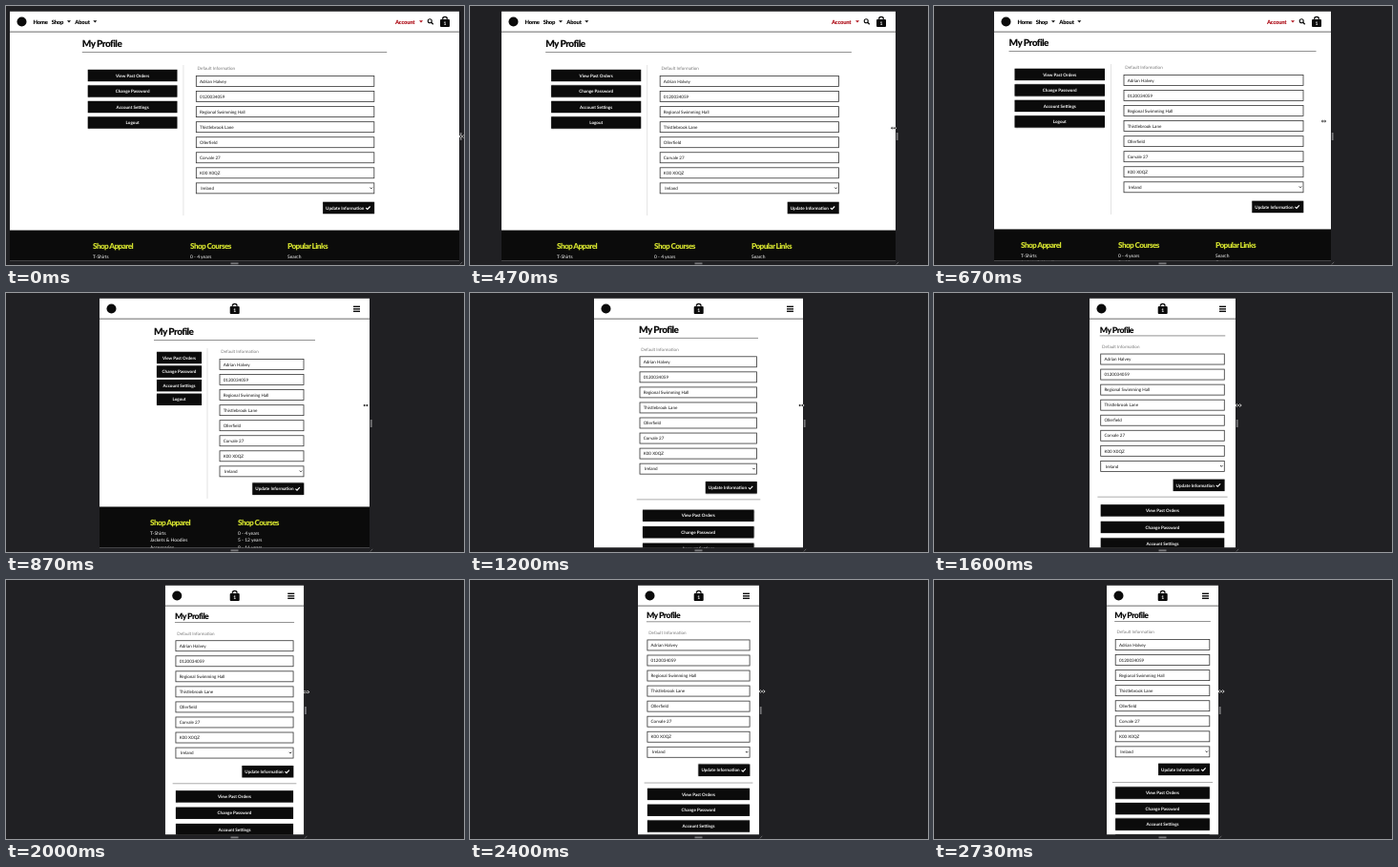
An HTML page with a canvas for the animation above (2.94 s loop, 480 by 272 pixels).

```html
<!DOCTYPE html>
<html lang="en">
<head>
<meta charset="utf-8">
<title>Responsive profile page</title>
<style>
  html, body { margin: 0; height: 100%; overflow: hidden; background: #202023; }
  canvas { display: block; width: 100vw; height: 100vh; }
</style>
</head>
<body>
<canvas id="stage" width="480" height="272"></canvas>
<script>
const ctx = document.getElementById('stage').getContext('2d');
const LOOP = 2940, FPS = 15, CENTER = 239.5, TOP = 5.5, BOTTOM = 267.5;
const INK = '#0b0b0b';

// [tick, left page edge, pointer x, pointer y]
const drag = [
  [3, 4, 478, 137], [5, 13, 467, 133], [10, 63, 408.5, 121], [11, 76, 398, 120],
  [13, 98, 377, 118], [15, 114, 362, 118], [18, 130, 347, 118], [19, 133, 344, 118],
  [22, 153, 328, 118], [24, 163, 319, 118], [27, 163, 319, 118], [35, 173, 307.5, 117],
  [36, 176, 306, 117], [41, 181, 301, 117]
];

// Breakpoints by page width. x is relative to the centre, y to the first field.
const layouts = [
  { min: 350, hr: 161, title: -35.8, rule: -30.5, form: [-40.5, 147.5], update: 133,
    menu: [-155, -60.5], menuY: -6, pitch: 16.5, divider: -54, footer: 156.5, columns: [-148.5, -46.5, 55.5] },
  { min: 292, hr: 134, title: -35.8, rule: -30.5, form: [-34, 123], update: 133,
    menu: [-129, -51], menuY: -6, pitch: 16.5, divider: -46, footer: 156, columns: [-125, -39, 47] },
  { min: 226, hr: 84.5, title: -30.5, rule: -25.5, form: [-15.5, 72.5], update: 130.7,
    menu: [-81.5, -34.5], menuY: -7, pitch: 14.6, divider: -28.5, footer: 149.5, columns: [-88.5, 3.5] },
  { min: 169, hr: 62.5, title: -30, rule: -25, form: [-61.5, 61], update: 132,
    menu: [-58.5, 58], menuY: 161.5, pitch: 17.5 }
];

const fields = ['Adrian Halvey', '0120034059', 'Regional Swimming Hall', 'Thistlebrook Lane',
  'Ollerfield', 'Corvale 27', 'K00 X0QZ', 'Ireland'];
const menuItems = ['View Past Orders', 'Change Password', 'Account Settings', 'Logout'];
const footerLists = [
  ['Shop Apparel', 'T-Shirts', 'Jackets & Hoodies', 'Accessories'],
  ['Shop Courses', '0 - 4 years', '5 - 12 years', '8 - 16 years'],
  ['Popular Links', 'Search', 'Contact']
];

function sample(tick) {
  if (tick <= drag[0][0]) return drag[0];
  const i = drag.findIndex(key => key[0] >= tick);
  if (i < 0) return drag[drag.length - 1];
  const a = drag[i - 1], b = drag[i], p = (tick - a[0]) / (b[0] - a[0]);
  return a.map((v, j) => v + (b[j] - v) * p);
}

function layoutFor(width) {
  const found = layouts.find(l => width >= l.min);
  if (found) return found;
  const hr = .43 * width, form = [1 - hr, hr - 1];
  return { hr, title: -28, rule: -24.6, form, update: 119.5 + .04 * width + 6.7, menu: form,
    menuY: 144.8 + .092 * width, pitch: 13.2 + .0285 * width, small: true };
}

function rect(x, y, w, h, color) {
  ctx.fillStyle = color;
  ctx.fillRect(x, y, w, h);
}

function path(points, color, width) {
  ctx.beginPath();
  points.forEach(p => ctx.lineTo(...p));
  ctx.strokeStyle = color;
  ctx.lineWidth = width;
  ctx.stroke();
}

function text(str, x, y, { size = 4.55, weight = 400, color = '#111', align = 'left', spacing = 0 } = {}) {
  ctx.font = `${weight} ${size}px Lato, sans-serif`;
  ctx.letterSpacing = spacing + 'px';
  ctx.textAlign = align;
  ctx.fillStyle = color;
  ctx.fillText(str, x, y);
}

function display(str, x, y, size, color = INK, spacing = -.55) {
  text(str, x, y, { size, weight: 900, color, spacing });
}

function button(x, y, w, h) {
  ctx.shadowColor = 'rgba(0,0,0,.45)';
  ctx.shadowBlur = 1.5;
  rect(x, y - h / 2, w, h, INK);
  ctx.shadowBlur = 0;
}

function caret(x, y, color) {
  ctx.fillStyle = color;
  ctx.beginPath();
  ctx.moveTo(x - 2, y - 1);
  ctx.lineTo(x + 2, y - 1);
  ctx.lineTo(x, y + 1.2);
  ctx.fill();
}

function bag(x) {
  ctx.fillStyle = INK;
  ctx.beginPath();
  ctx.roundRect(x - 5, 14, 10, 8, 1);
  ctx.fill();
  ctx.beginPath();
  ctx.arc(x, 13.8, 2.4, Math.PI, 0);
  ctx.strokeStyle = INK;
  ctx.lineWidth = 1.4;
  ctx.stroke();
  text('1', x, 20, { size: 5, weight: 700, color: '#fff', align: 'center' });
}

function nav(left, right, wide) {
  rect(left, 26.7, right - left, .8, '#444');
  ctx.fillStyle = INK;
  ctx.beginPath();
  ctx.arc(left + 12.5, 16.5, 5, 0, 7);
  ctx.fill();
  if (!wide) {
    bag(CENTER + .2);
    for (let i = 0; i < 3; i++) rect(right - 17, 13.6 + i * 2.5, 7, 1.4, INK);
    return;
  }
  const red = '#b0131d';
  const link = (str, x, color) => display(str, x, 18.8, 5.9, color, -.25);
  link('Home', left + 24.5);
  link('Shop', left + 43.7);
  link('About', left + 68.3);
  caret(left + 62, 16.2, INK);
  caret(left + 89.3, 16.2, INK);
  link('Account', right - 67, red);
  caret(right - 40, 16.2, red);
  ctx.beginPath();
  ctx.arc(right - 30.8, 15.7, 2, 0, 7);
  ctx.strokeStyle = INK;
  ctx.lineWidth = 1.1;
  ctx.stroke();
  path([[right - 29.3, 17.2], [right - 27.3, 19.3]], INK, 1.3);
  bag(right - 15);
}

function form([x0, x1], y0, updateY) {
  text('Default Information', x0 + 1.3, y0 - 11.7, { color: '#777' });
  fields.forEach((value, i) => {
    const y = y0 + i * 16.05, isSelect = i === fields.length - 1;
    ctx.strokeStyle = '#333';
    ctx.lineWidth = .8;
    ctx.strokeRect(x0, y - 5.5, x1 - x0, 11);
    text(value, x0 + (isSelect ? 5 : 3.7), y + 1.7);
    if (isSelect) path([[x1 - 4.2, y - .8], [x1 - 3, y + .5], [x1 - 1.8, y - .8]], '#111', .8);
  });
  button(x1 - 53.7, updateY, 54, 12.5);
  text('Update Information', x1 - 50.7, updateY + 1.7, { size: 4.6, weight: 700, color: '#fff' });
  path([[x1 - 8.6, updateY], [x1 - 7, updateY + 1.5], [x1 - 4.2, updateY - 1.5]], '#fff', 1.1);
}

function menu([x0, x1], y0, pitch) {
  menuItems.forEach((label, i) => {
    const y = y0 + i * pitch;
    button(x0, y, x1 - x0, 12.4);
    text(label, (x0 + x1) / 2, y + 1.6, { weight: 700, color: '#fff', align: 'center' });
  });
}

function footer(left, right, y, columns) {
  rect(left, y, right - left, BOTTOM - y, INK);
  columns.forEach((x, i) => {
    const [heading, ...items] = footerLists[i];
    display(heading, CENTER + x, y + 19.8, 8.2, '#cfdc2e', -.6);
    items.forEach((item, j) => text(item, CENTER + x, y + 29.2 + j * 7.5, { size: 4.9, color: '#fff' }));
  });
}

function page(left, right) {
  const width = right - left, l = layoutFor(width);
  const y = Math.min(79, 63.1 + .042 * width);
  const k = 1 - .008 * Math.max(0, width - 353) / 118;
  const at = x => CENTER + x * k;
  ctx.save();
  ctx.beginPath();
  ctx.rect(left, TOP, width, BOTTOM - TOP);
  ctx.clip();
  rect(left, TOP, width, BOTTOM - TOP, '#fff');
  nav(left, right, width >= 292);
  display('My Profile', at(-l.hr), y + l.title, l.small ? 8.7 : 10);
  rect(at(-l.hr), y + l.rule - .4, 2 * l.hr * k, .8, '#777');
  form(l.form.map(at), y, y + l.update);
  menu(l.menu.map(at), y + l.menuY, l.pitch);
  if (l.footer) {
    rect(at(l.divider) - .4, y - 17, .8, 158, '#ddd');
    footer(left, right, y + l.footer, l.columns);
  } else {
    rect(CENTER - l.hr - 2.3, y + 144.2, 2 * l.hr + 4.6, .8, '#999');
  }
  ctx.restore();
}

function handles(right) {
  rect(235.5, 269.5, 8, 1.8, '#77777a');
  rect(right + .8, 133, 1.8, 8, '#77777a');
  path([[right + .8, 271.5], [right + 3.2, 268.8]], '#77777a', .7);
}

function pointer(x, y) {
  for (const [color, width] of [['#fff', 1.7], ['#111', .8]]) {
    path([[x - 2, y], [x + 2, y]], color, width);
    for (const d of [-1, 1])
      path([[x + d, y - 1], [x + d * 2.2, y], [x + d, y + 1]], color, width);
  }
}

function draw() {
  const t = performance.now() % LOOP;
  const [, left, x, y] = sample(Math.floor((t + 3.5) * FPS / 1000));
  const right = 2 * CENTER - left;
  rect(0, 0, 480, 272, '#202023');
  page(left, right);
  handles(right);
  pointer(x, y);
  requestAnimationFrame(draw);
}

ctx.textRendering = 'geometricPrecision';
draw();
</script>
</body>
</html>
```
